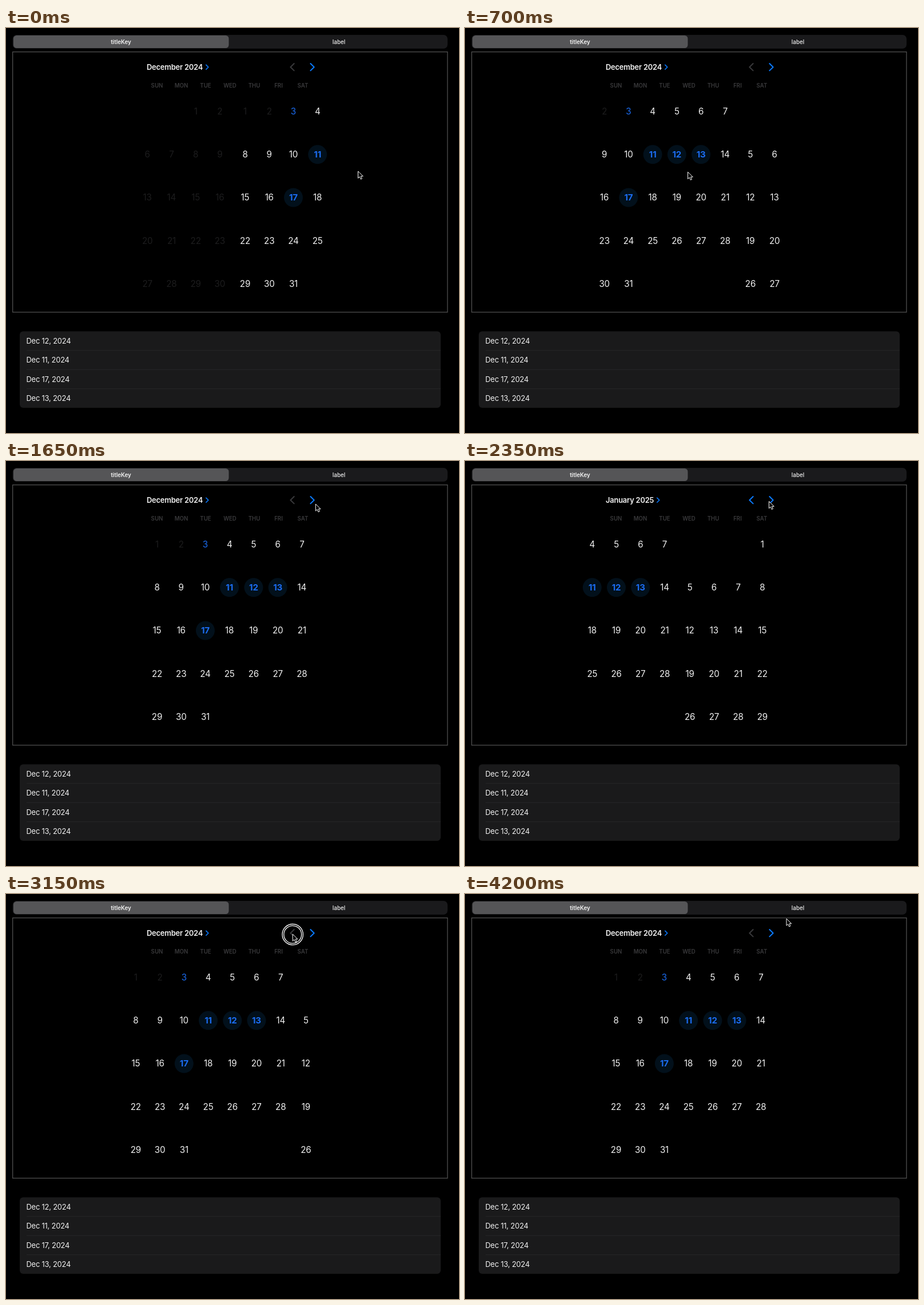
These frames come from a looping animation (792x707 px, 4250 ms). An HTML page:

```html
<!DOCTYPE html>
<html lang="en">
<head>
<meta charset="utf-8">
<title>Calendar picker</title>
<style>
html, body { margin: 0; width: 100%; height: 100%; overflow: hidden; background: #000; }
svg { display: block; width: 792px; height: 707px; font-family: Inter, Roboto, sans-serif; fill: #f2f2f2; }
.mid { text-anchor: middle; }
.seg { font-size: 9.8px; font-weight: 500; }
.title { font-size: 12.9px; font-weight: 600; letter-spacing: -.2px; }
.week { font-size: 9.7px; font-weight: 600; fill: #39393b; }
.row { font-size: 12.9px; letter-spacing: -.2px; }
.day { font-size: 15.2px; letter-spacing: -.2px; }
.past { fill: #1c1c1d; }
.today, .picked { fill: #1b6cf0; }
.picked { font-weight: 700; }
.line { fill: none; stroke: #0a7aff; stroke-width: 2; stroke-linecap: round; stroke-linejoin: round; }
</style>
</head>
<body>
<svg id="stage" viewBox="0 0 792 707">
  <rect x="11.5" y="12" width="760.5" height="24" rx="7" fill="#1a1a1c"/>
  <rect x="13" y="13" width="376.5" height="22" rx="5.5" fill="#555557"/>
  <text class="seg mid" x="201" y="27.5" style="font-weight:600">titleKey</text>
  <text class="seg mid" x="582" y="27.5">label</text>
  <rect x="11.7" y="41.7" width="760.2" height="454.4" fill="none" stroke="#555" stroke-width="1.2"/>
  <text id="title" class="title" x="246" y="73"></text>
  <path id="more" class="line" d="M0 64.4 4 68.3 0 72.2" style="stroke-width:1.6"/>
  <path id="prev" class="line" d="M503.7 62 497.4 68.2 503.7 74.4"/>
  <path class="line" d="M532.4 62 538.7 68.2 532.4 74.4"/>
  <g id="week"></g>
  <g id="days"></g>
  <rect x="24" y="529.5" width="736" height="133.5" rx="6" fill="#1a1a1b"/>
  <g id="list"></g>
  <g id="pointer">
    <g id="ring" fill="none" stroke="#fff" stroke-width="1.3">
      <circle cy=".7" r="18.2"/><circle cy=".7" r="15.4"/>
    </g>
    <path d="M0 0V12.2L2.8 9.6 4.7 14 6.9 13 5 8.8H8.8Z" fill="#000" stroke="#fff"/>
  </g>
</svg>
<script>
const LOOP = 4250, PAGE = 297.5, COL = 42.23, LEFT = 264;
const $ = id => document.getElementById(id);

function add(parent, tag, attrs, text = '') {
  const el = document.createElementNS('http://www.w3.org/2000/svg', tag);
  for (const k in attrs) el.setAttribute(k, attrs[k]);
  el.textContent = text;
  parent.append(el);
  return el;
}

'SUN MON TUE WED THU FRI SAT'.split(' ').forEach((name, i) =>
  add($('week'), 'text', { class: 'week mid', x: 264 + 42.5 * i, y: 104.3 }, name));

[12, 11, 17, 13].forEach((day, i) => {
  const y = 529.5 + 33.4 * i;
  if (i) add($('list'), 'path', { d: `M36 ${y}H760`, stroke: '#272728' });
  add($('list'), 'text', { class: 'row', x: 35.5, y: y + 21.3 }, `Dec ${day}, 2024`);
});

// Month pages: position, first weekday, length
const cells = [];
for (const [page, first, length] of [[-1, 5, 30], [0, 0, 31], [1, 3, 31]]) {
  for (let day = 1; day <= length; day++) {
    const slot = first + day - 1, y = 145.6 + 75.2 * Math.floor(slot / 7);
    const picked = page === 0 && [11, 12, 13, 17].includes(day);
    const kind = picked ? 'picked'
      : page < 0 || page === 0 && day < 3 ? 'past'
      : page === 0 && day === 3 ? 'today' : '';
    const g = add($('days'), 'g', {});
    if (picked) add(g, 'circle', { cy: y, r: 16.5, fill: '#02101b' });
    add(g, 'text', { class: `day mid ${kind}`, y: y + 5.4 }, day);
    cells.push({ g, x: LEFT + page * PAGE + slot % 7 * COL });
  }
}

const clamp = v => Math.min(1, Math.max(0, v));
const ease = v => (1 - Math.cos(Math.PI * clamp(v))) / 2;
const settle = ms => (1 + ms / 50) * Math.exp(-ms / 50);

function scroll(t) {
  if (t < 450) return 154 * settle(t);
  if (t < 650) return -85 * ease((t - 450) / 200);
  if (t < 1500) return -85 * settle(t - 650);
  if (t < 3100) return -PAGE * ease((t - 2195.5) / 285);
  return -PAGE * (1 - ease((t - 2919) / 300));
}

// Pointer stops: time, x, y
const stops = [
  [0, 615.5, 250], [450, 468.3, 257.3], [650, 385, 258], [1000, 478, 122.5],
  [1100, 522, 79], [1300, 540, 68], [1650, 541.3, 75], [2050, 541, 69],
  [2200, 541, 69], [2350, 531.5, 70.5], [2750, 533, 70], [2950, 501.2, 70],
  [3300, 501.2, 70], [3900, 564, 40], [4150, 562, 43], [LOOP, 562, 43]
];

function pointer(t) {
  const i = stops.findIndex(s => s[0] > t);
  const a = stops[i - 1], b = stops[i], k = ease((t - a[0]) / (b[0] - a[0]));
  return [a[1] + (b[1] - a[1]) * k, a[2] + (b[2] - a[2]) * k];
}

const within = (t, a, b) => t >= a && t < b;

function draw(t) {
  const january = within(t, 2195, 3100), shift = scroll(t);
  $('title').textContent = january ? 'January 2025' : 'December 2024';
  $('more').setAttribute('transform', `translate(${january ? 335.8 : 349.8})`);
  $('prev').style.stroke = january ? '#0a7aff' : '#39393b';
  for (const { g, x } of cells) {
    const at = x + shift;
    g.setAttribute('display', at > 221.6 && at < 561.45 ? 'inline' : 'none');
    g.setAttribute('transform', `translate(${at.toFixed(2)})`);
  }
  $('pointer').setAttribute('transform', `translate(${pointer(t)})`);
  const pressed = within(t, 425, 650) || within(t, 2045, 2245) || within(t, 2945, 3195);
  $('ring').setAttribute('display', pressed ? 'inline' : 'none');
}

let start;
function tick(now) {
  start ??= now;
  draw((now - start) % LOOP);
  requestAnimationFrame(tick);
}
draw(0);
requestAnimationFrame(tick);
</script>
</body>
</html>
```
